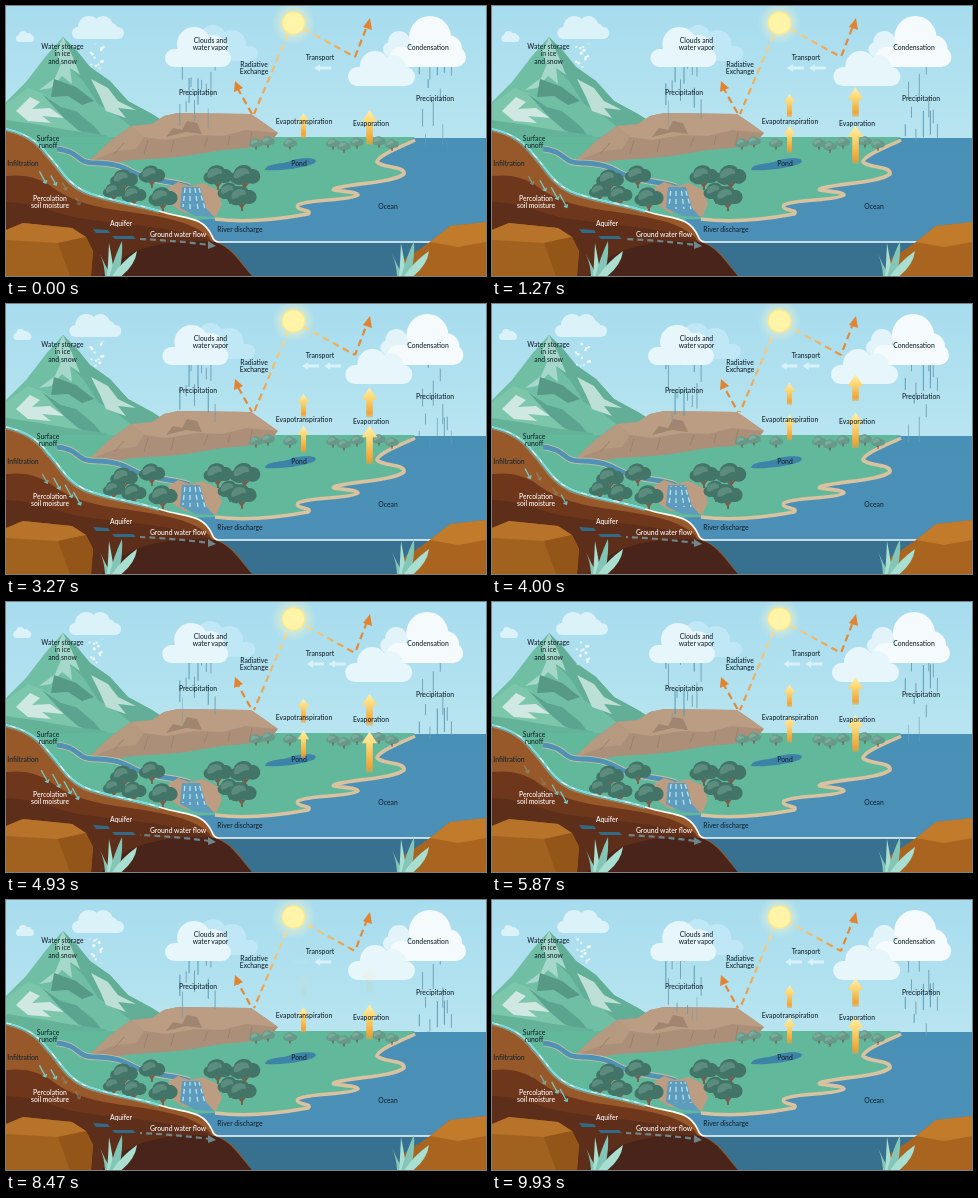
Animation of 480 by 270 pixels, one loop 9.99 s. Source, as an HTML page:

```html
<!DOCTYPE html>
<html lang="en">
<head>
<meta charset="utf-8">
<title>Water cycle</title>
<style>
html, body { margin: 0; width: 100%; height: 100%; overflow: hidden; background: #aedfec; }
svg { display: block; width: 480px; height: 270px; }
text { font: 500 6.8px Lato, "Open Sans", sans-serif; text-anchor: middle; fill: #17252e; }
.light { fill: #fff; }
</style>
</head>
<body>
<svg id="stage" viewBox="0 0 480 270">
  <defs>
    <linearGradient id="sky" x2="0" y2="1"><stop stop-color="#a7dcee"/><stop offset="1" stop-color="#b9e5f0"/></linearGradient>
    <linearGradient id="sea" x2="0" y2="1"><stop stop-color="#4990b6"/><stop offset="1" stop-color="#4c8fb8"/></linearGradient>
    <radialGradient id="glow"><stop offset=".45" stop-color="#fff6b8" stop-opacity=".5"/><stop offset="1" stop-color="#fff6c4" stop-opacity="0"/></radialGradient>
    <linearGradient id="rayL" gradientUnits="userSpaceOnUse" x1="282" y1="28" x2="247" y2="108"><stop stop-color="#f8dc91"/><stop offset="1" stop-color="#e6923c"/></linearGradient>
    <linearGradient id="rayR" gradientUnits="userSpaceOnUse" x1="297" y1="24" x2="349" y2="51"><stop stop-color="#f8dc91"/><stop offset="1" stop-color="#e6923c"/></linearGradient>
    <linearGradient id="heat" x2="0" y2="1"><stop stop-color="#fff0ad"/><stop offset=".35" stop-color="#fdd772"/><stop offset=".85" stop-color="#f2a435"/><stop offset="1" stop-color="#f0a038" stop-opacity=".5"/></linearGradient>
  </defs>

  <rect width="480" height="140" fill="url(#sky)"/>
  <g id="farClouds"></g>

  <!-- mountains -->
  <path d="M0 96L20 76L40 50L57 31L71 45L84 61L104 75L122 95L146 108L185 133H0Z" fill="#70bea4"/>
  <path d="M57 31L71 45L84 61L104 75L122 95L146 108L185 133H140L112 110L92 98L78 76L64 62Z" fill="#62ae97"/>
  <path d="M57 31L50 47L55 58L49 72L33 84L45 82L56 70L66 78L64 62L74 69L66 49Z" fill="#a5d8ca"/>
  <path d="M48 73L70 81L88 95L76 99L62 90L45 91Z" fill="#569985"/>
  <path d="M0 98L22 82L38 88L55 101L70 105L88 120L102 137H0Z" fill="#7cc6ac"/>
  <path d="M10 105L24 91L34 96L26 103L44 102L58 112L36 110L45 117L22 115Z" fill="#cfe8e1"/>
  <path d="M85 73L102 82L112 95L130 104L112 102L120 112L100 105L94 91Z" fill="#bcdfd6"/>
  <path d="M36 88L55 101L70 105L88 120L102 137L72 124L58 112Z" fill="#5ba48f"/>
  <path d="M0 114L28 118L62 124L100 129L110 140H0Z" fill="#64b398"/>

  <!-- sea and land -->
  <rect y="132" width="480" height="138" fill="url(#sea)"/>
  <path d="M0 131H409C393 142 372 149 371 156C376 162 400 160 398 168C388 176 352 177 330 182C318 186 350 184 352 189C345 195 302 193 292 199C288 205 308 203 302 208C275 213 240 217 209 213L150 215L-5 190Z" fill="#62b89b"/>
  <path d="M409 134C393 142 372 149 371 156C376 162 400 160 398 168C388 176 352 177 330 182C318 186 350 184 352 189C345 195 302 193 292 199C288 205 308 203 302 208C275 213 240 217 209 213" fill="none" stroke="#d8c29f" stroke-width="3.6" stroke-linejoin="round"/>
  <path d="M259 164C261 156 278 159 287 154C299 151 317 152 307 158C292 163 274 165 259 164Z" fill="#3d83a8"/>

  <!-- plateau -->
  <path d="M82 156L103 136L125 120L146 118L158 110L172 107L245 108L258 117L272 127L262 139L240 142L216 144L180 150L160 152L128 154L98 158Z" fill="#ac8f78"/>
  <path d="M125 120L146 118L158 110L172 107L245 108L258 117L272 127L240 124L216 130L190 129L160 134L138 131Z" fill="#ba9d83"/>
  <path d="M103 136L125 120L138 131L130 143L110 145L82 156Z" fill="#b59a80"/>
  <path d="M160 131L167 122L176 124L181 115L191 117L196 128L180 126Z" fill="#a08570"/>
  <path d="M108 148L118 137M138 148L142 134M165 146L168 134M198 141L202 131M222 139L224 130M244 136L246 126" stroke="#98806d" stroke-width=".9"/>

  <!-- river -->
  <path d="M51 143C77 146 67 157 91 157C124 158 122 168 145 173C164 177 171 176 184 181" fill="none" stroke="#c9c1a3" stroke-width="6.5"/>
  <path d="M51 143C77 146 67 157 91 157C124 158 122 168 145 173C164 177 171 176 184 181" fill="none" stroke="#4f92b6" stroke-width="4.8"/>
  <path d="M162 182L172 176L184 180L197 177L211 184L216 198L210 211L196 206L178 207L166 199Z" fill="#bd9d82"/>
  <path d="M176 181H194L200 202L208 211L190 210L174 202Z" fill="#5d9cbd"/>
  <path id="falls" d="M179 182L177 201M184 182L184 203M189 182L192 203M193 182L199 203" fill="none" stroke="#b8e3ef" stroke-width="1.3" stroke-dasharray="5 3"/>
  <g id="trees"></g>

  <!-- underground -->
  <path d="M0 123C18 127 31 134 42 149C56 164 60 176 78 185C98 194 128 197 153 205C180 214 196 209 206 230L212 236H480V270H0Z" fill="#97592a"/>
  <path d="M0 170C17 168 30 171 42 178C58 190 70 196 98 202C139 209 181 211 203 231L222 270H0Z" fill="#6e371c"/>
  <path d="M0 196C25 196 44 205 67 211C113 219 174 221 206 235L226 270H0Z" fill="#5d2e19"/>
  <path d="M96 270C120 240 165 233 208 236C224 240 232 254 246 270Z" fill="#49241a"/>
  <path d="M210 236H480V270H246C234 254 226 241 210 236Z" fill="#38718f"/>
  <path d="M87 223L102 224L104 227H90ZM106 230L127 230L130 233H109Z" fill="#326b87"/>
  <path id="shore" d="M0 123C18 127 31 134 42 149C56 164 60 176 78 185C98 194 128 197 153 205C180 214 196 209 206 230Q208 236 213 236H480" fill="none" stroke="#f4fcfb" stroke-width="1.7"/>
  <g fill="none" stroke="#6fdde3">
    <path d="M0 124C18 128 30 135 41 150C55 165 59 177 77 186C98 195 128 198 153 206" stroke-width="3" opacity=".4"/>
    <path id="runoff" d="M0 123C18 127 31 134 42 149C56 164 60 176 78 185C98 194 128 197 153 205" stroke-width="1.7" stroke-dasharray="18 6 5 4"/>
  </g>
  <path id="groundFlow" d="M134 233C157 234 180 236 204 239" fill="none" stroke="#70858a" stroke-width="2.2" stroke-dasharray="6 4"/>
  <path d="M202 235L210 240L202 243Z" fill="#70858a"/>
  <g id="seep" stroke="#76c8c7" fill="none" stroke-width="1.3"></g>

  <!-- foreground -->
  <path d="M0 224L17 217L66 222L80 231L87 245L85 270H0Z" fill="#a1611f"/>
  <path d="M0 224L17 217L66 222L80 231L52 237L0 234Z" fill="#b67329"/>
  <path d="M80 231L87 245L85 270H64L52 237Z" fill="#945519"/>
  <path d="M480 216L444 220L424 236L414 243L397 254L392 270H480Z" fill="#a9651f"/>
  <path d="M480 216L444 220L424 236L452 241L480 236Z" fill="#c17b2a"/>
  <g id="grass"></g>

  <g id="rain"></g>
  <g id="clouds"></g>
  <g id="snow" fill="#f0fafb"></g>

  <!-- sunlight -->
  <circle id="halo" cx="287.5" cy="17" r="22" fill="url(#glow)"/>
  <circle cx="287.5" cy="17" r="11.8" fill="#ffe88a"/>
  <circle cx="287.5" cy="17" r="10.6" fill="#fff4a8"/>
  <g fill="none" stroke-width="2.2" stroke-dasharray="7 4.5">
    <path class="ray" stroke="url(#rayL)" d="M282 28L248 108"/>
    <path class="ray" stroke="#e38a38" d="M246 108L232 83"/>
    <path class="ray" stroke="url(#rayR)" d="M298 23L349 51"/>
    <path class="ray" stroke="#e38a38" d="M349 51L361 20"/>
  </g>
  <path d="M229 75L228 86L237 82ZM364 12L357 21L366 24Z" fill="#e2832f"/>

  <g id="heatArrows" fill="url(#heat)"></g>
  <g id="windArrows" fill="#f0fafd"></g>
  <g id="labels"></g>
</svg>

<script>
const LOOP = 9990, STEP = 66.6, CYCLE = 2120;
const $ = id => document.getElementById(id);

function set(node, attrs) {
  for (const k in attrs) node.setAttribute(k, attrs[k]);
}
function add(parent, tag, attrs = {}) {
  const node = document.createElementNS('http://www.w3.org/2000/svg', tag);
  set(node, attrs);
  return parent.appendChild(node);
}
const mod = (a, n) => ((a % n) + n) % n;
const clamp = v => Math.max(0, Math.min(1, v));
const rand = n => mod(Math.sin(n * 91.7 + 4.1) * 43758.5, 1);

function tree(x, y, s, dark = '#437468', pale = '#5b8c7e') {
  const g = add($('trees'), 'g', { transform: `translate(${x} ${y}) scale(${s})` });
  add(g, 'path', { d: 'M0 0V-8M0 -3L-5 -10M0 -4L5 -10', stroke: '#775d4c', 'stroke-width': 1.8, fill: 'none' });
  add(g, 'path', { d: 'M-10 -7C-16 -9-14 -16-10 -17C-9 -24 3 -26 6 -20C13 -21 17 -12 11 -8C7 -5 3 -8 0 -7C-4 -5-8 -5-10 -7Z', fill: dark });
  add(g, 'path', { d: 'M-10 -12C-11 -17-7 -21-2 -21C3 -21 5 -17 3 -15C-1 -17-5 -10-10 -12Z', fill: pale });
}
for (const [x, y] of [[250, 144], [262, 142], [284, 144], [327, 144], [338, 147], [351, 143], [373, 142], [386, 145]])
  tree(x, y, .5, '#67998a', '#7dab99');
for (const [x, y, s] of [[146, 182, .95], [118, 187, 1], [212, 184, 1.05], [239, 185, 1.1], [108, 196, .8], [128, 201, .9],
  [157, 206, 1.05], [224, 198, .9], [236, 205, 1.05]]) tree(x, y, s);

function tuft(x) {
  [[-13, 22], [-4, 33], [9, 35], [24, 25]].forEach(([dx, h], i) => {
    add($('grass'), 'path', {
      d: `M${x - 8 + i * 2} 272Q${x + dx * .4 - 3} ${270 - h * .5} ${x + dx} ${270 - h}Q${x + dx * .8 + 3} ${270 - h * .4} ${x + i * 2} 272Z`,
      fill: i % 2 ? '#a8dfd0' : '#83c5b7'
    });
  });
}
tuft(107);
tuft(399);

// Lobes are circles; the base is a rounded bar [x, y, width, height].
function cloud(layer, fill, base, lobes) {
  const g = add($(layer), 'g', { fill });
  const [x, y, width, height] = base;
  add(g, 'rect', { x, y, width, height, rx: height / 2 });
  for (const [cx, cy, r] of lobes) add(g, 'circle', { cx, cy, r });
  return g;
}
const clouds = [
  cloud('farClouds', '#dcf2f9', [10, 29, 18, 7], [[17, 29, 4], [22, 31, 4]]),
  cloud('farClouds', '#dcf2f9', [66, 21, 52, 12], [[83, 21, 11], [97, 20, 10], [105, 24, 7]]),
  cloud('clouds', '#bfe7f5', [190, 40, 62, 15], [[207, 32, 13], [226, 38, 14]]),
  cloud('clouds', '#e7f6fb', [159, 43, 66, 18], [[188, 38, 17], [207, 43, 14]]),
  cloud('clouds', '#e2f4fa', [377, 36, 26, 15], [[393, 36, 11]]),
  cloud('clouds', '#f5fbfd', [384, 41, 76, 20], [[424, 31, 21], [442, 43, 14]]),
  cloud('clouds', '#e7f6fb', [342, 61, 67, 19], [[369, 60, 15], [387, 62, 13]])
];

function rainfall(x, width, top, bottom, count, seed) {
  return Array.from({ length: count }, (_, i) => {
    const at = x + width * (i + rand(seed + i + 60)) / count;
    return {
      top, bottom, len: 8 + rand(seed + i) * 19, shift: rand(seed + i + 30),
      node: add($('rain'), 'line', { x1: at, x2: at, stroke: i % 3 ? '#6f9db0' : '#4f93ad', 'stroke-width': 1 })
    };
  });
}
const drops = [...rainfall(171, 40, 59, 127, 12, 3), ...rainfall(411, 35, 59, 148, 12, 17)];

const flakes = Array.from({ length: 13 }, (_, i) => ({
  x: 84 + rand(i + 80) * 13, shift: rand(i + 110),
  node: add($('snow'), 'circle', { r: 1 + rand(i + 140) * .6 })
}));

function heatArrow(x, start, travel, half, stem, age) {
  return { x, start, travel, half, stem, age, node: add($('heatArrows'), 'path') };
}
const heat = [];
for (const age of [0, 1]) heat.push(
  heatArrow(297.5, 139, 64, 5.8, [20, 13], age),
  heatArrow(363.5, 142, 76, 7.8, [32, 14], age)
);

const wind = [0, 1].map(age => ({
  age, node: add($('windArrows'), 'path', { d: 'M0 0L6 -3.8V-1.5H17V1.5H6V3.8Z' })
}));

const seeps = [[32, 163], [44, 168], [56, 176], [65, 184]].map(([x, y], i) => ({
  x, y, shift: i * .12, node: add($('seep'), 'path')
}));

function label(x, y, text, light) {
  text.split('/').forEach((line, i) => {
    add($('labels'), 'text', { x, y: y + i * 7.4, class: light ? 'light' : '' }).textContent = line;
  });
}
label(56.5, 43, 'Water storage/in ice/and snow');
label(204.5, 36.5, 'Clouds and/water vapor');
label(248, 61, 'Radiative/Exchange');
label(314, 54, 'Transport');
label(422, 43.5, 'Condensation');
label(192, 89, 'Precipitation');
label(429, 94.5, 'Precipitation');
label(298, 118, 'Evapotranspiration');
label(365, 120, 'Evaporation');
label(42, 135, 'Surface/runoff');
label(17, 159.5, 'Infiltration');
label(44, 194.5, 'Percolation/soil moisture', true);
label(115, 220, 'Aquifer', true);
label(172, 231, 'Ground water flow', true);
label(234, 226, 'River discharge');
label(293, 159.5, 'Pond');
label(382, 203, 'Ocean');

// An arrow lives for two cycles, so a pair overlaps by one cycle.
const lifeAt = (t, age) => mod(t / CYCLE + 1 + age, 2) / 2;
const fade = life => clamp(life * 14) * clamp((1 - life) * 18);

function draw(t) {
  const s = t / 1000;
  const sway = Math.cos(t / (4 * CYCLE) * 2 * Math.PI) - 1;
  for (const g of clouds) set(g, { transform: `translate(${sway * 1.5} 0)` });
  set($('halo'), { r: 22 + Math.sin(s * 3) });
  for (const ray of document.querySelectorAll('.ray')) set(ray, { 'stroke-dashoffset': -s * 10 });
  set($('runoff'), { 'stroke-dashoffset': -s * 24 });
  set($('groundFlow'), { 'stroke-dashoffset': -s * 9 });
  set($('falls'), { 'stroke-dashoffset': -s * 15 });

  for (const d of drops) {
    const p = mod(s * .55 + d.shift, 1), y = d.top + p * (d.bottom - d.top);
    set(d.node, { y1: Math.max(d.top, y - d.len), y2: y, opacity: .9 * clamp((1 - p) * 7) });
  }
  for (const f of flakes) {
    const p = mod(s * .27 + f.shift, 1);
    set(f.node, { cx: f.x + Math.sin(s * 2 + f.shift * 9), cy: 37 + p * 27, opacity: clamp(p * 8) * clamp((1 - p) * 6) });
  }
  for (const a of heat) {
    const life = lifeAt(t, a.age), h = a.half, w = h * .42, neck = h * 1.5;
    const end = neck + a.stem[0] + (a.stem[1] - a.stem[0]) * life;
    set(a.node, {
      d: `M0 0L${h} ${neck}H${w}V${end}H${-w}V${neck}H${-h}Z`,
      transform: `translate(${a.x} ${a.start - a.travel * life})`,
      opacity: fade(life)
    });
  }
  for (const a of wind) {
    const life = lifeAt(t, a.age);
    set(a.node, { transform: `translate(${330 - 44 * life} 62)`, opacity: fade(life) * .65 });
  }
  for (const a of seeps) {
    const p = mod(t / CYCLE + .3 - a.shift, 1), x = a.x + p * 5, y = a.y + p * 8, n = 6 + 7 * Math.sin(p * Math.PI);
    set(a.node, {
      d: `M${x} ${y}l${n * .55} ${n}m-3 -1.2l3 1.2l.7 -3`,
      opacity: clamp(p * 6) * clamp((1 - p) * 5)
    });
  }
}

const origin = performance.now();
function tick(now) {
  const t = Math.max(0, now - origin) % LOOP;
  draw(Math.floor(t / STEP) * STEP);
  requestAnimationFrame(tick);
}
draw(0);
requestAnimationFrame(tick);
</script>
</body>
</html>
```
